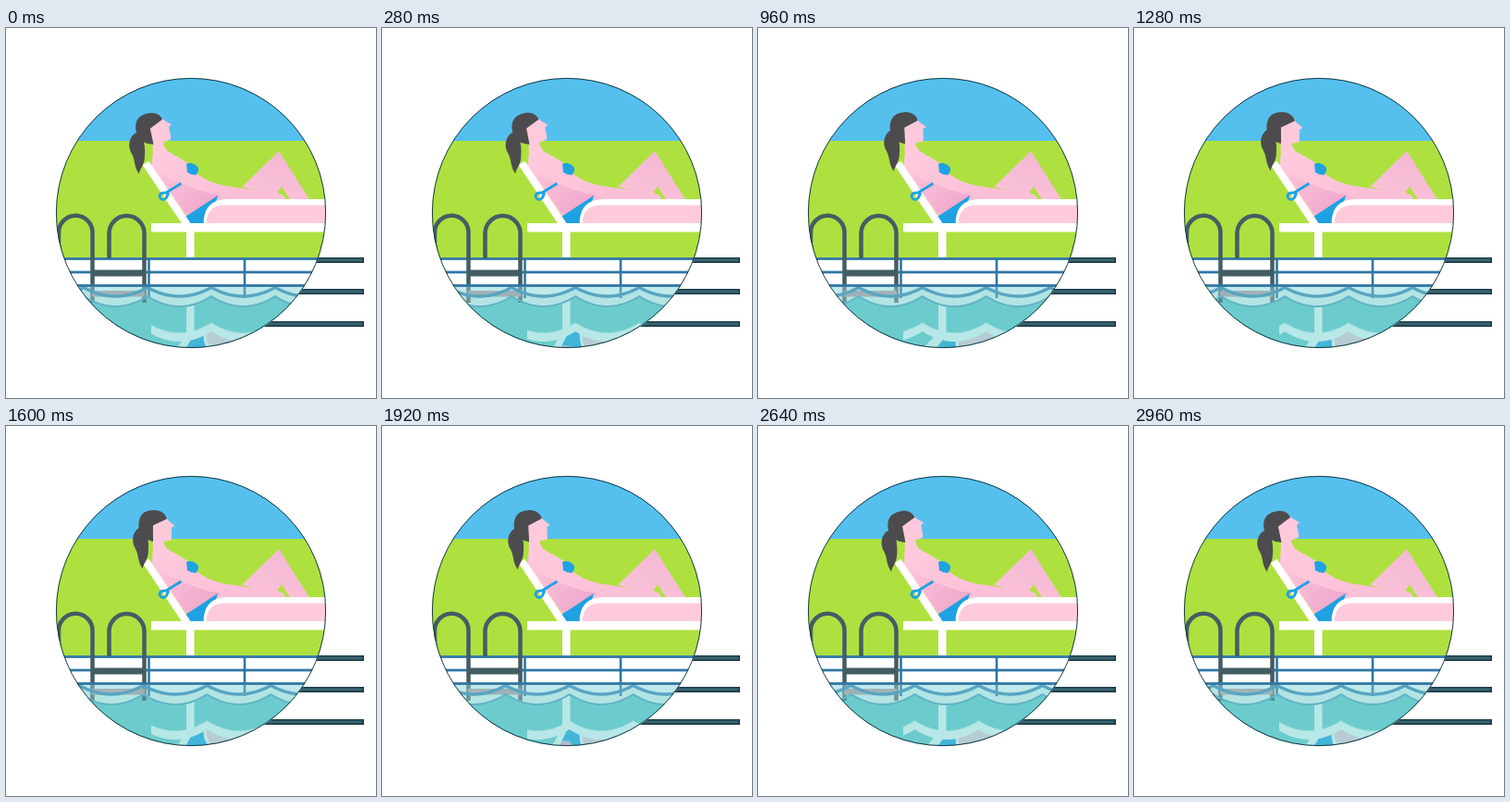
These frames come from a looping animation (400 px wide and 400 px high, 3 s). An HTML page with a canvas:

```html
<!DOCTYPE html>
<html>
<head>
<meta charset="utf-8">
<title>Poolside</title>
<style>
html, body { margin: 0; width: 100%; height: 100%; overflow: hidden; background: #fff; }
canvas { display: block; width: 400px; height: 400px; }
</style>
</head>
<body>
<canvas id="stage" width="400" height="400"></canvas>
<script>
const LOOP = 3000, PERIOD = 69, RIPPLE = 11;
const NOD = 2880, NOD_ANGLE = 12 * Math.PI / 180;
const STEEL = '#435d63', LINE = '#3077a3', HAIR = '#4c4c4e', BLUE = '#1ea2e2', PINK = '#ffc9dc';

const ctx = document.getElementById('stage').getContext('2d');

function fill(c, color, d) {
  c.fillStyle = color;
  c.fill(new Path2D(d));
}

function stroke(c, color, width, d) {
  c.strokeStyle = color;
  c.lineWidth = width;
  c.stroke(new Path2D(d));
}

function rect(c, color, x, y, w, h) {
  c.fillStyle = color;
  c.fillRect(x, y, w, h);
}

function fade(c, x0, y0, x1, y1, from, to) {
  const g = c.createLinearGradient(x0, y0, x1, y1);
  g.addColorStop(0, from);
  g.addColorStop(1, to);
  return g;
}

function layer(draw) {
  const cv = document.createElement('canvas');
  cv.width = cv.height = 400;
  draw(cv.getContext('2d'));
  return cv;
}

// Sunbather without the head, plus the chair
function lounge(c) {
  // raised leg
  fill(c, fade(c, 295, 135, 275, 185, '#f5b8d3', '#fbc2d9'),
    'M255 172 L295 133 L329 187 H308 L298 171 L292 180 Z');
  // torso and lying leg
  fill(c, fade(c, 170, 130, 235, 200, PINK, '#fbbfd8'),
    'M158 116 L170 122 Q170 131 178 135 L197 146 L206 157 Q216 166 236 170.5 Q262 175 290 177 Q301 179 303 187 L228 190 L197 206 L157 150 Q160 136 158 116 Z');
  // arm
  fill(c, fade(c, 160, 145, 215, 195, '#ffc9dc', '#efa9cd'),
    'M159 138 Q161 156 180 164 Q210 178 232 181 L224 187 L196 203 L158 149 Z');
  fill(c, BLUE, 'M195 147 Q201 144 207 150 Q210 154 205 159 Q200 159 196 156 Z');
  fill(c, BLUE, 'M194 204 L229 181 Q227 192 216 202 L214 213 H199 Z');
  // chair
  fill(c, '#fff', 'M213.5 213 Q213 185 240 185 H346 V213 Z');
  fill(c, '#ffcbdc', 'M216.5 211 Q217 191.5 237 191.5 H346 V211 Z');
  stroke(c, '#fff', 8, 'M151 146 L196 213');
  rect(c, '#fff', 157, 211, 190, 9.5);
  rect(c, '#fff', 195, 220, 8.5, 28);
  stroke(c, BLUE, 2.8, 'M189.5 168 L173 178 Q166 178 166 182 Q168 188 173 184 L176 178');
}

function ladder(c) {
  stroke(c, STEEL, 4.5, 'M57 240 V221 A18 18 0 0 1 93.5 221 V297');
  stroke(c, STEEL, 4.5, 'M111.5 249 V222 A19 19 0 0 1 149.5 222 V297');
  rect(c, STEEL, 93, 261.5, 57, 7);
  rect(c, '#8f8f96', 93, 284, 57, 6.5);
}

function wallLine(c, y) {
  rect(c, LINE, 50, y - 1.4, 300, 2.8);
}

function wallSeams(c, y, h) {
  for (const x of [154.5, 258]) rect(c, LINE, x - 1.3, y, 2.6, h);
}

const backdrop = layer(c => {
  for (const y of [248, 282, 317]) {
    rect(c, '#193a45', 200, y, 187, 6);
    rect(c, '#3c6470', 200, y + 1.4, 185.5, 3);
  }
  c.beginPath();
  c.arc(200, 200, 146, 0, 7);
  c.clip();
  rect(c, '#55c0ee', 50, 50, 300, 72);
  rect(c, '#aee13f', 50, 122, 300, 127);
  rect(c, '#fff', 50, 248, 300, 32);
  wallLine(c, 249.5);
  wallLine(c, 264);
  wallSeams(c, 249, 30);
  lounge(c);
});

const mirror = layer(c => {
  c.translate(0, 550);
  c.scale(1, -1);
  lounge(c);
});

const rails = layer(ladder);

function head(k) {
  ctx.save();
  ctx.translate(4 * k, -3.5 * k);
  fill(ctx, HAIR, 'M141 113 C133 117 131 128 136 136 C140 143 138 150 144 158 C144 152 150 149 150 138 C151 127 148 118 146 114 Z');
  ctx.restore();

  ctx.save();
  ctx.translate(163, 123);
  ctx.rotate((k - 1) * NOD_ANGLE);
  ctx.translate(-163, -123);
  fill(ctx, PINK, 'M158 103 L173 98 L175.5 102 L182.5 108 L179 110 V121 Q179 124 175 124 L170 125 L159 126 Z');
  fill(ctx, HAIR, 'M143.5 109 C143 97 149 91 159 91 C167 90 173 95 174 100.5 L159 107.5 V125 C150 123 145 118 143.5 109 Z');
  ctx.restore();
}

// 0 at a crest, 1 at the bottom of a scallop
function dip(x, shift) {
  const u = (((x - 222 + shift) / PERIOD) % 1 + 1) % 1;
  return 4 * u * (1 - u);
}

function wave(top, depth, shift) {
  const p = new Path2D();
  for (let x = 50; x <= 350; x++) p.lineTo(x, top + depth * dip(x, shift));
  return p;
}

function below(edge) {
  const p = new Path2D(edge);
  p.lineTo(350, 350);
  p.lineTo(50, 350);
  p.closePath();
  return p;
}

function poolLadder() {
  ctx.drawImage(rails, 0, 0, 400, 279, 0, 0, 400, 279);
  ctx.globalAlpha = 0.6;
  ctx.drawImage(rails, 0, 279, 400, 25, 0, 279, 400, 25);
  ctx.globalAlpha = 1;
}

function water(shift) {
  const upper = wave(280.5, 9.5, shift), lower = wave(290, RIPPLE, shift);
  rect(ctx, '#bfe9eb', 50, 279.5, 300, 70);
  ctx.fillStyle = '#b3e4e4';
  ctx.fill(below(upper));
  ctx.globalAlpha = 0.7;
  wallSeams(ctx, 280, 12);
  ctx.globalAlpha = 1;
  ctx.fillStyle = '#6ccccd';
  ctx.fill(below(lower));

  ctx.save();
  ctx.clip(below(lower));
  ctx.globalAlpha = 0.52;
  for (let x = 150; x < 346; x++) {
    ctx.drawImage(mirror, x, 290, 1, 110, x, 290 + RIPPLE * (dip(x + 0.5, shift) - 1), 1, 110);
  }
  ctx.restore();

  poolLadder();
  ctx.lineWidth = 3.4;
  ctx.strokeStyle = '#58a5c2';
  ctx.stroke(upper);
  ctx.lineWidth = 2;
  ctx.strokeStyle = '#62b4c6';
  ctx.stroke(lower);
  wallLine(ctx, 278.5);
}

function draw(t) {
  rect(ctx, '#fff', 0, 0, 400, 400);
  ctx.drawImage(backdrop, 0, 0);
  ctx.save();
  ctx.beginPath();
  ctx.arc(200, 200, 146, 0, 7);
  ctx.clip();
  head(t < NOD ? (1 - Math.cos(2 * Math.PI * t / NOD)) / 2 : 0);
  water(2 * PERIOD * t / LOOP);
  ctx.restore();
  ctx.beginPath();
  ctx.arc(200, 200, 145.6, 0, 7);
  ctx.lineWidth = 1;
  ctx.strokeStyle = '#173843';
  ctx.stroke();
}

function tick() {
  draw(performance.now() % LOOP);
  requestAnimationFrame(tick);
}
tick();
</script>
</body>
</html>
```
